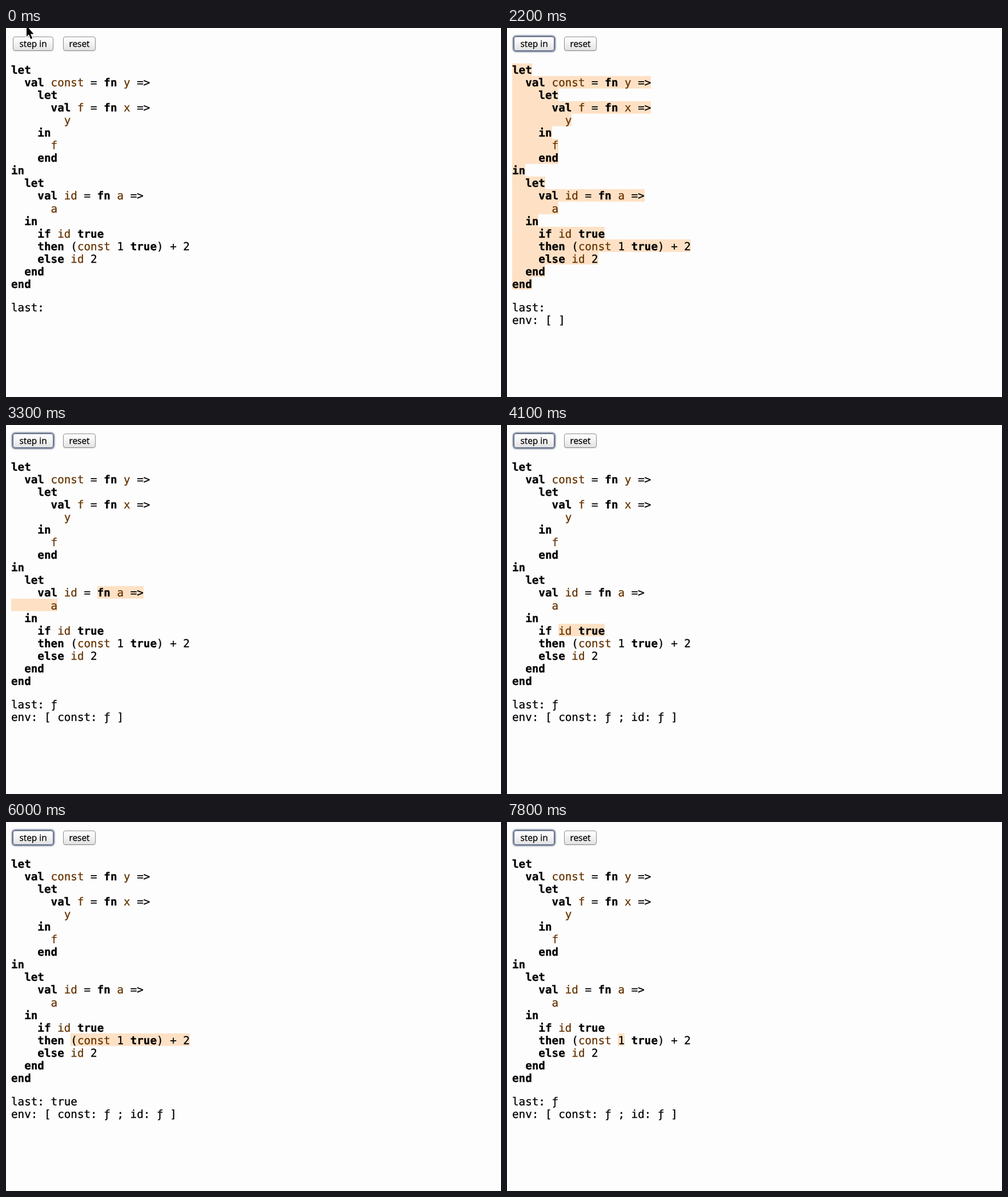
Recreate the animation shown at these times as an HTML page. Size 867x646 px, loop 8000 ms.

```html
<!DOCTYPE html>
<html lang="en">
<head>
<meta charset="utf-8">
<title>Stepping evaluator</title>
<style>
html, body { margin: 0; width: 100%; height: 100%; overflow: hidden; background: #fdfdfd; }
#stage { position: relative; width: 867px; height: 646px; overflow: hidden; color: #000; -webkit-text-stroke: .3px; }
#stage > *, #marks i { position: absolute; }
pre { left: 9px; margin: 0; font: 19.25px/22px "DejaVu Sans Mono", monospace; text-rendering: geometricPrecision; }
#code { top: 63px; line-height: 22.04px; }
#out { top: 479px; }
var { font-style: normal; color: #630; }
#marks { left: 9px; top: 62px; }
#marks i { height: 22px; background: #fee1c5; }
.button {
  box-sizing: border-box; top: 15px; height: 25px; border: 1px solid #8e8e8e; border-radius: 4px;
  background: linear-gradient(#fff, #f4f4f4 45%, #e2e2e4);
  font: 15.4px/24px "Open Sans", sans-serif; text-align: center; white-space: nowrap;
  text-rendering: geometricPrecision; box-shadow: 0 1px 1px #0002;
}
#step { left: 12px; width: 71px; }
#reset { left: 100px; width: 57px; }
#step.focus { border-color: #65708a; box-shadow: 0 0 1px 1.5px #717b92, 0 0 3px 2px #8c95a8; }
#step.down {
  border-color: #4d566a; background: linear-gradient(#8e98aa, #6d788e 50%, #8792a6);
  box-shadow: 0 0 1px 1.5px #5d677d, 0 0 3px 2px #8c95a8;
}
</style>
</head>
<body>
<div id="stage">
  <div id="step" class="button">step in</div>
  <div id="reset" class="button">reset</div>
  <div id="marks"></div>
  <pre id="code"></pre>
  <pre id="out"></pre>
  <svg id="cursor" width="60" height="30" style="left:0;top:0;overflow:visible">
    <path d="M36 -4V15L40 11.3L43.2 19.2L46.2 18L43 10.6H48.5Z" stroke="#fff" stroke-width="2.4" paint-order="stroke"/>
  </svg>
</div>
<script>
const source = `let
  val const = fn y =>
    let
      val f = fn x =>
        y
    in
      f
    end
in
  let
    val id = fn a =>
      a
  in
    if id true
    then (const 1 true) + 2
    else id 2
  end
end`;
const DURATION = 8000, CHAR = 11.59, LINE = 22;
const lines = source.split("\n");
const $ = id => document.getElementById(id);

$("code").innerHTML = source.replace(/=>|[a-z]+/g, word =>
  word === "=>" ? "=&gt;" :
  /^(let|val|fn|in|end|if|then|else|true)$/.test(word) ? `<b>${word}</b>` : `<var>${word}</var>`);

const base = "const: ƒ", full = base + " ; id: ƒ";
// press time, release time, highlight [row, column, end row, end column], last value, environment
const steps = [
  [1700, 2000, [0, 0, 17, 3], "", ""],
  [2400, 2500, [1, 14, 7, 7], "", ""],
  [2700, 2800, [9, 2, 16, 5], "ƒ", base],
  [3100, 3200, [10, 13, 11, 7], "ƒ", base],
  [3600, 3700, [13, 4, 15, 13], "ƒ", full],
  [3900, 4000, [13, 7, 13, 14], "ƒ", full],
  [4400, 4500, [13, 7, 13, 9], "ƒ", full],
  [4800, 4900, [13, 10, 13, 14], "ƒ", full],
  [5200, 5300, [13, 7, 13, 14], "true", full],
  [5500, 5700, [11, 6, 11, 7], "true", base + " ; a: true"],
  [5900, 6000, [14, 9, 14, 27], "true", full],
  [6300, 6400, [14, 10, 14, 22], "true", full],
  [6800, 6900, [14, 10, 14, 17], "true", full],
  [7300, 7400, [14, 10, 14, 15], "true", full],
  [7700, 7800, [14, 16, 14, 17], "ƒ", full]
];

function markup([row, col, endRow, endCol]) {
  let html = "";
  for (let r = row; r <= endRow; r++) {
    const from = r === row ? col : 0;
    const to = r === endRow ? endCol : lines[r].length;
    html += `<i style="left:${from * CHAR}px;top:${r * LINE}px;width:${(to - from) * CHAR}px"></i>`;
  }
  return html;
}

let shown;
function showStep(step) {
  if (step === shown) return;
  shown = step;
  $("marks").innerHTML = step ? markup(step[2]) : "";
  $("out").textContent = step
    ? `last: ${step[3]}\nenv: [ ${step[4] ? step[4] + " " : ""}]`
    : "last:";
}

function draw(now) {
  const t = (now + 10) % DURATION;
  showStep(steps.filter(s => t >= s[1]).pop() || null);
  $("step").classList.toggle("focus", t >= 1500);
  $("step").classList.toggle("down", steps.some(s => t >= s[0] && t < s[1]));
  const exit = Math.min(1, Math.max(0, (t - 500) / 400));
  $("cursor").style.transform = `translateY(${-26 * exit * exit}px)`;
}

const start = performance.now();
function tick() {
  draw(performance.now() - start);
  requestAnimationFrame(tick);
}
tick();
</script>
</body>
</html>
```
